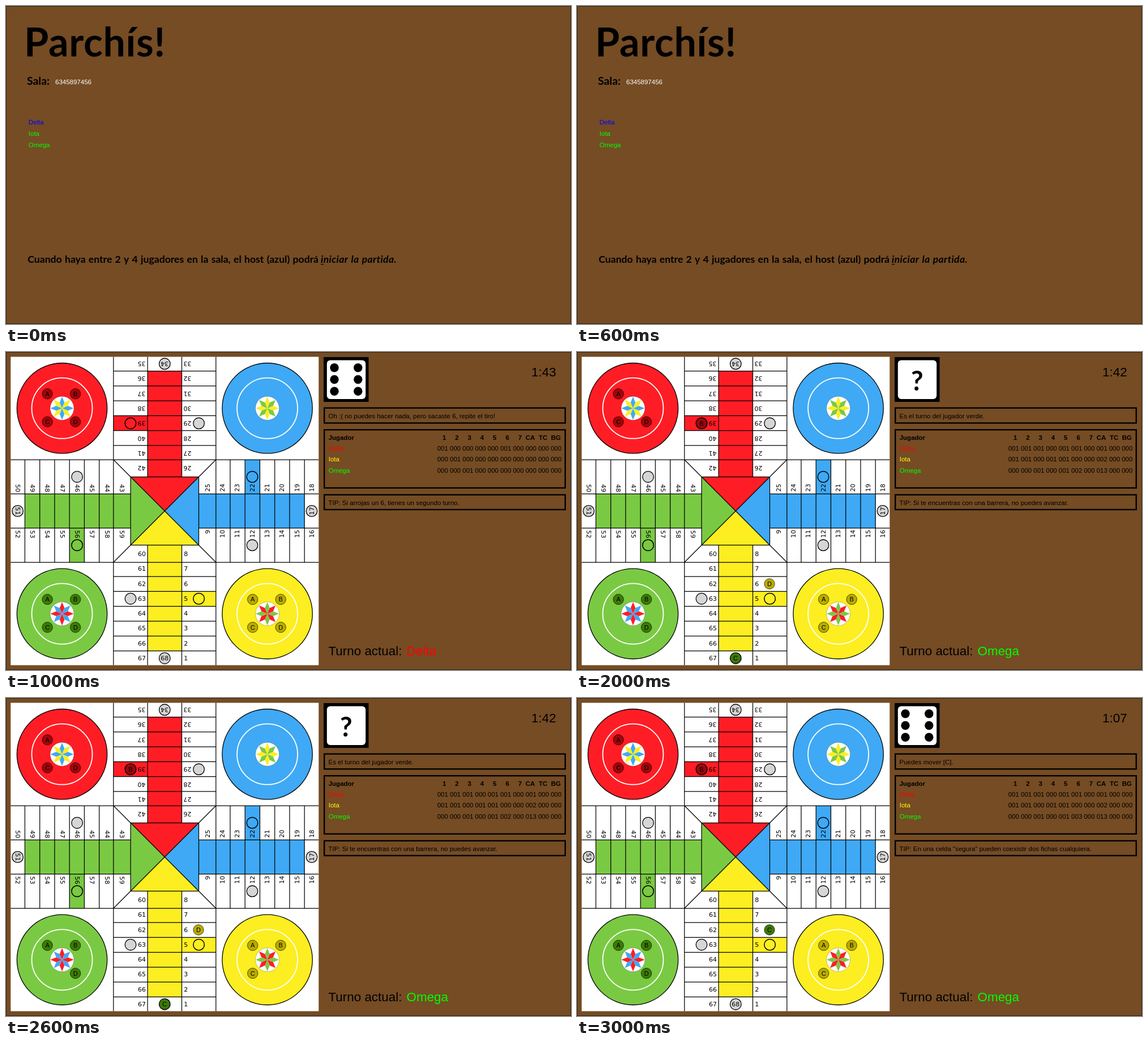
Recreate the animation shown at these times as an HTML page with a canvas. Size 998 by 561 pixels, loop 4 s.

```html
<!DOCTYPE html>
<html lang="es">
<head>
<meta charset="utf-8">
<title>Parchís</title>
<style>
html, body { margin: 0; width: 100%; height: 100%; overflow: hidden; background: #754c24; }
canvas { display: block; }
</style>
</head>
<body>
<canvas id="stage" width="998" height="561"></canvas>
<script>
const ctx = document.getElementById('stage').getContext('2d');
const SANS = '"Liberation Sans", Arial, sans-serif';
const LATO = 'Lato, sans-serif';
const DEJAVU = '"DejaVu Sans", sans-serif';
const RED = '#ff1d25', BLUE = '#3fa9f5', YELLOW = '#fcee21', GREEN = '#7ac943';
const CX = 280.3, CY = 280.5;   // board centre
const HALF = 272;               // half the board side
const HOME = 181.3;             // offset of the home circles
const PLAYERS = ['Delta', 'Iota', 'Omega'];
const INK = ['#f00', '#ff0', '#0f0'];
const TOKEN = { r: '#a0060b', y: '#b9ab00', g: '#3c7a05' };
const HOMES = { r: [-1, -1], y: [1, 1], g: [-1, 1] };

const SCORES = [
  '1 1 1 0 1 1 0 1 0 0',
  '1 1 0 1 1 0 0 2 0 0'
];
const SCENES = [
  null,
  {
    clock: '1:43', dice: 6, turn: 0,
    note: 'Oh :( no puedes hacer nada, pero sacaste 6, repite el tiro!',
    tip: 'Si arrojas un 6, tienes un segundo turno.',
    scores: ['1 0 0 0 0 1 0 0 0 0', '0 1 0 0 0 0 0 0 0 0', '0 0 1 0 0 0 0 0 0 0'],
    home: { r: 'ABCD', y: 'ABCD', g: 'ABCD' }, out: []
  },
  {
    clock: '1:42', dice: 0, turn: 2,
    note: 'Es el turno del jugador verde.',
    tip: 'Si te encuentras con una barrera, no puedes avanzar.',
    scores: [...SCORES, '0 0 1 0 1 2 0 13 0 0'],
    home: { r: 'ACD', y: 'ABC', g: 'ABD' },
    out: [['r', 'B', 220, 125.5], ['y', 'D', 340, 409], ['g', 'C', 280, 540]]
  },
  {
    clock: '1:07', dice: 6, turn: 2,
    note: 'Puedes mover [C].',
    tip: 'En una celda "segura" pueden coexistir dos fichas cualquiera.',
    scores: [...SCORES, '0 0 1 0 1 3 0 13 0 0'],
    home: { r: 'ACD', y: 'ABC', g: 'ABD' },
    out: [['r', 'B', 220, 125.5], ['g', 'C', 340, 409]]
  }
];

function text(str, x, y, font, color = '#000', align = 'left', spacing = 0, wordGap = 0) {
  ctx.font = font;
  ctx.fillStyle = color;
  ctx.textAlign = align;
  ctx.letterSpacing = spacing + 'px';
  ctx.wordSpacing = wordGap + 'px';
  ctx.fillText(str, x, y);
}

const small = (str, x, y, color, align) => text(str, x, y, '11.5px ' + SANS, color, align);
const large = (str, x, y, color) => text(str, x, y, '22.4px ' + SANS, color);

function disc(x, y, r, fill, stroke, width = 1.3) {
  ctx.beginPath();
  ctx.arc(x, y, r, 0, Math.PI * 2);
  if (fill) { ctx.fillStyle = fill; ctx.fill(); }
  if (stroke) { ctx.strokeStyle = stroke; ctx.lineWidth = width; ctx.stroke(); }
}

function poly(points, fill) {
  ctx.beginPath();
  points.forEach(([x, y]) => ctx.lineTo(x, y));
  ctx.closePath();
  ctx.fillStyle = fill;
  ctx.fill();
}

function line(x1, y1, x2, y2) {
  ctx.beginPath();
  ctx.moveTo(x1, y1);
  ctx.lineTo(x2, y2);
  ctx.strokeStyle = '#000';
  ctx.lineWidth = 1.25;
  ctx.stroke();
}

function frame(y, h) {
  ctx.strokeStyle = '#000';
  ctx.lineWidth = 2.4;
  ctx.strokeRect(562.2, y + 1.2, 425.6, h - 2.4);
}

// The arms are drawn as the bottom one and turned by quarter turns.
const EDGE = 246.9, STEP = 26.25;

function armFill(color) {
  ctx.fillStyle = color;
  ctx.fillRect(-30.2, 60, 60.4, EDGE - 60);
  ctx.fillRect(30.2, EDGE - 4 * STEP, 60.3, STEP);
  poly([[0, 0], [60.2, 60.2], [-60.2, 60.2]], color);
}

function armLines(turn) {
  for (let i = 0; i < 6; i++) line(-90.5, EDGE - i * STEP, 90.5, EDGE - i * STEP);
  line(-90.5, 90.5, 90.5, 90.5);
  line(-60.2, 60.2, 60.2, 60.2);
  line(0, 0, 90.5, 90.5);
  for (const s of [-1, 1]) {
    line(s * 30.2, 60.2, s * 30.2, HALF);
    line(s * 90.5, 90.5, s * 90.5, HALF);
  }

  disc(-60.3, 154.7, 9.8, '#d6d6d6', '#000');
  disc(60.3, 154.7, 9.8, null, '#000', 1.5);
  disc(0, 259.7, 9.8, '#d6d6d6', '#000');

  const font = '11px ' + DEJAVU;
  for (let i = 0; i < 8; i++) {
    const y = 79.4 + 26.3 * i;
    const right = (8 - 17 * turn - i + 67) % 68 + 1;
    text(60 - 17 * turn + i, -33.2, y, font, '#000', 'right');
    text(right, 33.9, y, font);
  }
  text(68 - 17 * turn, 0, 263.7, font, '#000', 'center');
}

function eachArm(paint) {
  [YELLOW, GREEN, RED, BLUE].forEach((color, turn) => {
    ctx.save();
    ctx.translate(CX, CY);
    ctx.rotate(turn * Math.PI / 2);
    paint(color, turn);
    ctx.restore();
  });
}

function home(sx, sy, color, cross, diagonal) {
  ctx.save();
  ctx.translate(CX + sx * HOME, CY + sy * HOME);
  disc(0, 0, 79.7, color, '#000');
  disc(0, 0, 53.5, null, '#fff', 1.8);
  disc(0, 0, 21, '#fff', 'rgba(0,0,0,.4)', 0.6);
  for (let i = 0; i < 8; i++) {
    poly([[0, 0], [10.3, 4.2], [20.5, 0], [10.3, -4.2]], i % 2 ? diagonal : cross);
    ctx.rotate(Math.PI / 4);
  }
  ctx.restore();
}

function token(kind, letter, x, y) {
  disc(x, y, 9.2, TOKEN[kind], 'rgba(0,0,0,.65)', 1);
  text(letter, x, y + 4, '11px ' + SANS, '#000', 'center');
}

function board(scene) {
  ctx.fillStyle = '#fff';
  ctx.fillRect(CX - HALF, CY - HALF, HALF * 2, HALF * 2);
  eachArm(armFill);
  eachArm((color, turn) => armLines(turn));
  home(-1, -1, RED, BLUE, YELLOW);
  home(1, -1, BLUE, YELLOW, GREEN);
  home(1, 1, YELLOW, GREEN, RED);
  home(-1, 1, GREEN, RED, BLUE);

  for (const kind in scene.home) {
    const [sx, sy] = HOMES[kind];
    for (const letter of scene.home[kind]) {
      const n = 'ABCD'.indexOf(letter);
      token(kind, letter,
        CX + sx * HOME - 25.9 + (n % 2) * 49.5,
        CY + sy * HOME - 25.4 + (n >> 1) * 49.3);
    }
  }
  scene.out.forEach(piece => token(...piece));
}

function dice(value) {
  ctx.fillStyle = '#000';
  ctx.fillRect(561, 9, 79.5, 79);
  ctx.beginPath();
  ctx.roundRect(566.8, 14.5, 68.4, 68.5, 6);
  ctx.fillStyle = '#fff';
  ctx.fill();
  if (!value) {
    text('?', 600.8, 67.5, 'bold 47px ' + LATO, '#000', 'center');
    return;
  }
  for (const x of [580, 621.8])
    for (const y of [27.8, 48.5, 69.2]) disc(x, y, 7.7, '#000');
}

function table(scores) {
  const bold = 'bold 11.5px ' + SANS;
  frame(136, 105);
  text('Jugador', 569.7, 155, bold);
  for (let i = 0; i < 7; i++) text(i + 1, 774.1 + i * 22.3, 155, bold, '#000', 'center');
  ['CA', 'TC', 'BG'].forEach((s, i) => text(s, 926 + i * 22.7, 155, bold, '#000', 'center'));
  scores.forEach((row, r) => {
    const y = 174.2 + r * 19.2;
    small(PLAYERS[r], 569.7, y, INK[r]);
    row.split(' ').forEach((n, i) => small(n.padStart(3, '0'), 761.7 + i * 22.28, y));
  });
}

function game(scene) {
  board(scene);
  dice(scene.dice);
  large(scene.clock, 928, 43);
  frame(97.5, 29);
  small(scene.note, 569.5, 117);
  table(scene.scores);
  frame(250.7, 28.5);
  small('TIP: ' + scene.tip, 569.5, 269.7);
  large('Turno actual:', 569.5, 534.5);
  large(PLAYERS[scene.turn], 707.6, 534.5, INK[scene.turn]);
}

function lobby() {
  text('Parchís!', 32, 88.7, 'bold 70px ' + LATO, '#000', 'left', 0.7);
  text('Sala:', 37, 138.5, 'bold 19.4px ' + LATO);
  small('6345897456', 87, 137.5, '#fff');
  PLAYERS.forEach((name, i) => small(name, 39.8, 209.2 + i * 19.9, i ? '#0f0' : '#00f'));
  text('Cuando haya entre 2 y 4 jugadores en la sala, el host (azul) podrá',
    38.3, 453.3, 'bold 17.6px ' + LATO, '#000', 'left', 0, 1);
  text('iniciar la partida.', 556, 453.3, 'italic bold 17.6px ' + LATO, '#000', 'left', 0.35, 1);
  ctx.fillRect(556, 455, 5, 1.3);
}

function draw() {
  const scene = SCENES[Math.floor(performance.now() % 4000 / 1000)];
  ctx.fillStyle = '#754c24';
  ctx.fillRect(0, 0, 998, 561);
  ctx.strokeStyle = 'rgba(0,0,0,.55)';
  ctx.lineWidth = 1;
  ctx.strokeRect(0.5, 0.5, 997, 560);
  if (scene) game(scene); else lobby();
  requestAnimationFrame(draw);
}
draw();
</script>
</body>
</html>
```
